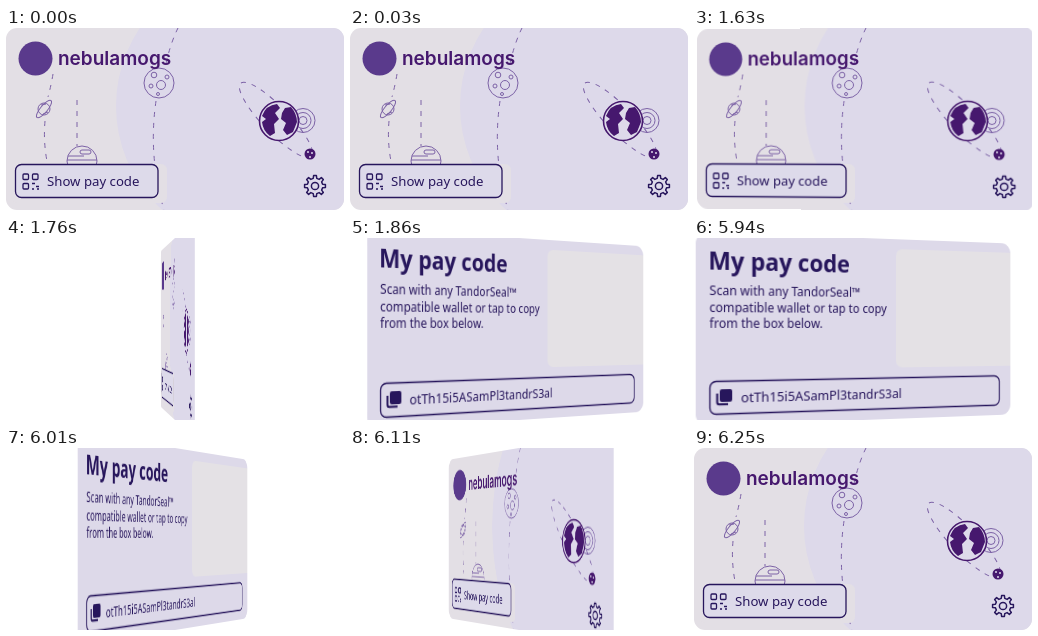
An HTML page that plays this animation: 338 by 182 pixels, repeating every 7.64 s.

```html
<!DOCTYPE html>
<html lang="en">
<head>
<meta charset="utf-8">
<title>Pay code card</title>
<style>
  html, body { margin: 0; width: 100%; height: 100%; overflow: hidden; background: #fff; }
  svg { position: absolute; left: 0; top: 0; width: 338px; height: 182px; border-radius: 11px; overflow: hidden; }
  text { font-family: "Noto Sans", sans-serif; font-size: 13.2px; fill: #27165c; }
  .brand { font: 600 19px Inter, sans-serif; fill: #46186e; }
  .title { font-size: 23.1px; font-weight: 700; }
  .note { font-size: 12.1px; }
  .line { fill: none; stroke: #7c62a6; stroke-width: 1; }
  .dash { stroke-dasharray: 5 6; }
  .dark { fill: #46186e; }
  .ink { fill: none; stroke: #27165c; stroke-width: 1.3; }
  .solid { fill: #27165c; }
</style>
</head>
<body>
<svg id="front" viewBox="0 0 338 182">
  <rect width="338" height="182" fill="#e3dfe5"/>
  <circle cx="250" cy="78" r="140" fill="#ddd9ea"/>

  <g class="line dash">
    <path d="M172 0Q164 16 159 40M150 73Q142 128 158 182"/>
    <path d="M47 46Q45 58 42 69M39 93Q37 116 42 138M71 72V118"/>
    <ellipse cx="270" cy="92" rx="51" ry="13" transform="rotate(46 270 92)"/>
  </g>

  <g class="line">
    <circle cx="38" cy="81" r="6"/>
    <ellipse cx="38" cy="81" rx="11" ry="3.5" transform="rotate(-50 38 81)"/>
    <path d="M35 77l5-1M37 86l5-2"/>
    <circle cx="153" cy="55" r="15" fill="#ddd9ea"/>
    <circle cx="155" cy="57" r="4.5"/>
    <circle cx="148" cy="47" r="2.8"/>
    <circle cx="161" cy="49" r="2"/>
    <circle cx="145" cy="58" r="2"/>
    <circle cx="152" cy="66" r="1.5"/>
    <circle cx="76" cy="133" r="15"/>
    <path d="M62 128H78M61 132H91"/>
    <rect x="74" y="122" width="11" height="4" rx="2"/>
    <circle cx="297" cy="92.5" r="4"/>
    <circle cx="297" cy="92.5" r="8"/>
    <circle cx="297" cy="92.5" r="12"/>
  </g>

  <circle cx="273" cy="93" r="19.5" fill="#ddd9ea" stroke="#46186e" stroke-width="1.6"/>
  <path class="dark" d="M256 88Q260 77 271 76L274 80L269 85L273 91L268 96L269 105L264 108Q257 103 256 94L260 91Z"/>
  <path class="dark" d="M279 80L285 79Q291 86 291 94L287 104L281 107L277 102L280 95L275 91L276 85Z"/>
  <circle class="dark" cx="304" cy="126" r="5.5"/>
  <g fill="#ddd9ea">
    <circle cx="302" cy="124" r="1"/><circle cx="306" cy="125" r="1"/><circle cx="304" cy="129" r="1"/>
  </g>

  <circle cx="29.5" cy="30.5" r="17" fill="#5a3a8c"/>
  <text class="brand" x="52" y="37">nebulamogs</text>

  <rect x="5" y="136" width="156" height="39" rx="6" fill="#e3dfe5"/>
  <rect class="ink" x="9.5" y="136.5" width="142.5" height="33" rx="6" style="fill:#dddaea"/>
  <g class="ink">
    <rect x="17" y="146" width="5.5" height="5.5" rx="1"/>
    <rect x="26.5" y="146" width="5.5" height="5.5" rx="1"/>
    <rect x="17" y="155.5" width="5.5" height="5.5" rx="1"/>
    <path d="M26 155.5h3M30 158.5h3M26 161h2M31 161h2"/>
  </g>
  <text x="41" y="158">Show pay code</text>

  <path class="ink" id="gear" stroke-linejoin="round" style="stroke-width:1.5"/>
  <circle class="ink" cx="309" cy="158" r="3.6" style="stroke-width:1.5"/>
</svg>

<svg id="back" viewBox="0 0 338 182">
  <rect width="338" height="182" fill="#ddd9e9"/>
  <rect x="205" y="10" width="140" height="120" rx="7" fill="#e4e1e5"/>
  <text class="title" x="12" y="35">My pay code</text>
  <text class="note" x="13" y="59.5">Scan with any TandorSeal™</text>
  <text class="note" x="13" y="75">compatible wallet or tap to copy</text>
  <text class="note" x="13" y="90.3">from the box below.</text>
  <rect class="ink" x="13.5" y="140.5" width="311" height="31" rx="6"/>
  <rect class="solid" x="23" y="148" width="12" height="12" rx="2"/>
  <path class="ink" d="M20.5 152V160Q20.5 162.3 22.5 162.3H31" style="stroke-width:2"/>
  <text x="43.5" y="161">otTh15i5ASamPl3tandrS3al</text>
</svg>

<script>
const LOOP = 7640;
const front = document.getElementById("front");
const back = document.getElementById("back");

// Eight teeth, four corners each
const corners = Array.from({ length: 32 }, (_, i) => {
  const r = i % 4 < 2 ? 10.5 : 7.8;
  const a = (Math.floor(i / 4) + [-0.17, 0.17, 0.29, 0.71][i % 4]) * Math.PI / 4 - Math.PI / 2;
  return `${309 + r * Math.cos(a)} ${158 + r * Math.sin(a)}`;
});
document.getElementById("gear").setAttribute("d", `M${corners.join("L")}Z`);

// Linear turn in nine equal steps, already under way at its first step
function turn(ms, span, first, step) {
  if (ms < 0) return 0;
  const k = Math.floor((ms + 4) * 9 / span);
  return Math.min(180, first + step * k);
}

function angleAt(t) {
  return turn(t - 1630, 300, 5, 19.85) - turn(t - 5940, 310, 22, 19.3);
}

function show(face, visible, deg) {
  face.style.visibility = visible ? "visible" : "hidden";
  face.style.transform = deg ? `perspective(1000px) rotateY(${deg}deg)` : "none";
}

const start = performance.now();
function draw() {
  const a = angleAt((performance.now() - start) % LOOP);
  show(front, a < 90, -a);
  show(back, a >= 90, 180 - a);
  requestAnimationFrame(draw);
}
draw();
</script>
</body>
</html>
```
